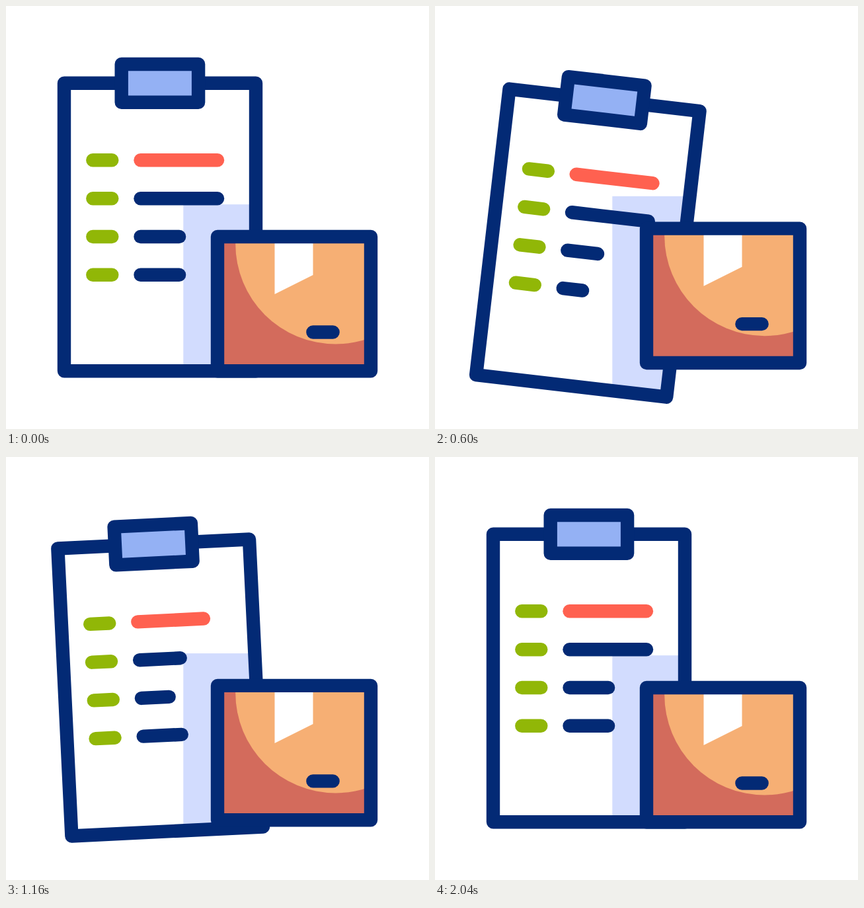
These frames come from a looping animation (640 by 640 pixels, 2.12 s). An HTML page:

```html
<!DOCTYPE html>
<html lang="en">
<head>
<meta charset="utf-8">
<title>Clipboard and parcel</title>
<style>
  html, body { margin: 0; width: 100%; height: 100%; overflow: hidden; background: #fff; }
  svg { display: block; width: 100vw; height: 100vh; }
  .ink { fill: none; stroke: #032a75; stroke-width: 20.4; stroke-linecap: round; stroke-linejoin: round; }
  .green { stroke: #91b707; }
  .red { stroke: #ff6150; }
</style>
</head>
<body>
<svg viewBox="0 0 640 640">
  <defs>
    <clipPath id="paper"><rect id="paperArea" x="88" y="116.7" width="290" height="435.5"/></clipPath>
    <clipPath id="side"><rect x="320" y="349" width="232" height="203.3"/></clipPath>
  </defs>
  <g clip-path="url(#paper)">
    <rect id="shade" x="268.3" y="300.2" width="200" height="400" fill="#d2dcfe"/>
  </g>
  <g id="board" class="ink">
    <rect x="88" y="116.7" width="290" height="435.5"/>
    <rect x="174.7" y="88" width="116.4" height="57.8" fill="#94b1f4"/>
    <path class="green" d="M131.3 233.3h29M131.3 291.2h29M131.3 349h29M131.3 406.8h29"/>
    <g id="lines"></g>
  </g>
  <g id="box">
    <g clip-path="url(#side)">
      <rect x="320" y="349" width="232" height="204" fill="#d36b5c"/>
      <circle cx="498.7" cy="360" r="151.5" fill="#f6af74"/>
      <path d="M406.5 349h58v58l-58 29z" fill="#fff"/>
    </g>
    <path class="ink" d="M320 349h232v203.3h-232zM464.4 493.5h30.2"/>
  </g>
</svg>
<script>
const LOOP = 2120, STEP = 40;
const byId = id => document.getElementById(id);

// Symmetric cubic-bezier(.5, 0, .5, 1)
function ease(x) {
  let low = 0, high = 1;
  for (let i = 0; i < 24; i++) {
    const u = (low + high) / 2;
    if (1.5 * u * (1 - u) + u ** 3 < x) low = u; else high = u;
  }
  return low * low * (3 - 2 * low);
}

// Eased value through [time, value] keys
function track(t, keys) {
  if (t <= keys[0][0]) return keys[0][1];
  for (let i = 1; i < keys.length; i++) {
    const [t0, v0] = keys[i - 1], [t1, v1] = keys[i];
    if (t < t1) return v0 + (v1 - v0) * ease((t - t0) / (t1 - t0));
  }
  return keys[keys.length - 1][1];
}

const tilt = [[35, 0], [520, 7], [1040, -3], [1590, 0]];
const sink = [[25, 0], [790, 27.1], [1558, 0]];
const hops = [
  { from: 45, to: 632, height: 60 },
  { from: 632, to: 1184, height: 18.6 },
  { from: 1184, to: 1565, height: 6 }
];
const lines = [
  { y: 233.3, length: 116.5, cut: 55, middle: 1497, color: 'red' },
  { y: 291.2, length: 116.5, cut: 55, middle: 1180 },
  { y: 349, length: 58.6, cut: 29.5, middle: 900 },
  { y: 406.8, length: 58.6, cut: 29.5, middle: 662 }
];

for (const line of lines) {
  line.path = document.createElementNS('http://www.w3.org/2000/svg', 'path');
  if (line.color) line.path.setAttribute('class', line.color);
  byId('lines').append(line.path);
}

function lift(t) {
  const hop = hops.find(h => t >= h.from && t < h.to);
  if (!hop) return 0;
  const x = (t - hop.from) / (hop.to - hop.from);
  return -4 * hop.height * x * (1 - x);
}

function draw(t) {
  const pose = `translate(0 ${track(t, sink)}) rotate(${track(t, tilt)} 233 320)`;
  byId('board').setAttribute('transform', pose);
  byId('paperArea').setAttribute('transform', pose);

  const hop = `translate(0 ${lift(t)})`;
  byId('box').setAttribute('transform', hop);
  byId('shade').setAttribute('transform', hop);

  for (const { y, length, cut, middle, path } of lines) {
    const now = track(t, [[middle - 560, length], [middle, length - cut], [middle + 560, length]]);
    path.setAttribute('d', `M203.5 ${y}h${now}`);
  }
}

const start = performance.now();
function tick() {
  const t = (performance.now() - start) % LOOP;
  draw(Math.floor(t / STEP) * STEP);
  requestAnimationFrame(tick);
}
tick();
</script>
</body>
</html>
```
